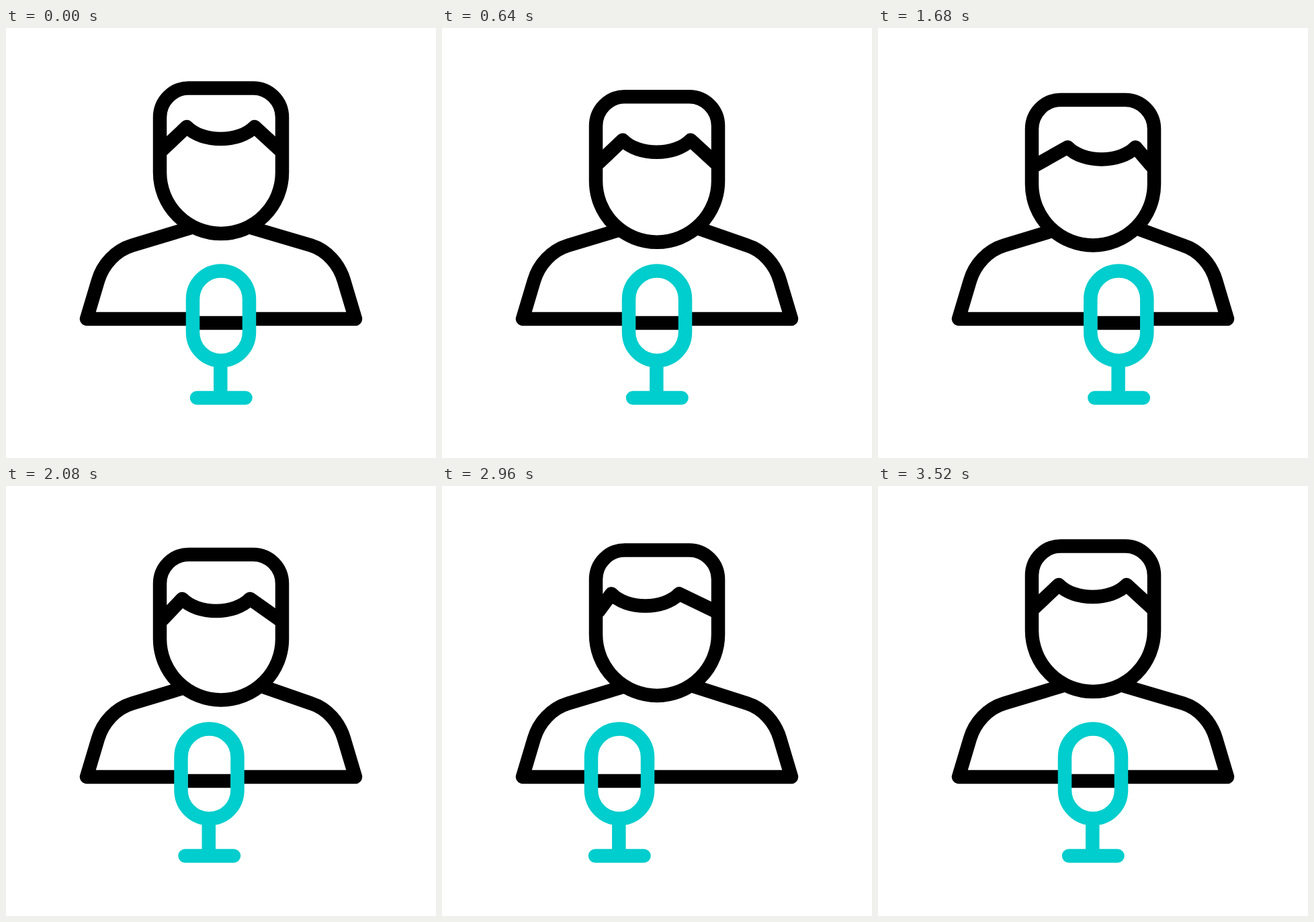
An HTML page for the animation above (3600 ms loop, 640 by 640 pixels).

```html
<!DOCTYPE html>
<html lang="en">
<head>
<meta charset="utf-8">
<title>Interview</title>
<style>
  html, body { margin: 0; width: 100%; height: 100%; overflow: hidden; background: #fff; }
  svg { display: block; width: 100%; height: 100%; }
</style>
</head>
<body>
<svg viewBox="0 0 640 640" fill="none" stroke="#000" stroke-width="20.5" stroke-linecap="round" stroke-linejoin="round">
  <path id="body"/>
  <path id="head" fill="#fff" d="M229 215V133A43 43.500 0 0 1 272 89.500H368A43 43.500 0 0 1 411 133V215A91 91 0 0 1 229 215Z"/>
  <path id="fringe"/>
  <g id="mic">
    <rect x="278" y="361.500" width="84" height="133.500" rx="42" fill="#fff" stroke="none"/>
    <path d="M288 439H352" stroke-linecap="butt"/>
    <g stroke="#00cdcd">
      <rect x="278" y="361.500" width="84" height="133.500" rx="42"/>
      <path d="M319.300 500V550M284 550.500H356.500"/>
    </g>
  </g>
</svg>
<script>
const LOOP = 3600, STEP = 20, REACH = 112;
const [body, head, fringe, mic] = ['body', 'head', 'fringe', 'mic'].map(id => document.getElementById(id));

// Steps at which the mic turns round, alternately left and right, from rest to rest
const turns = [0, 8, 24, 40, 50, 66, 77, 95, 115, 129, 140, 152, 176];
const END = turns[turns.length - 1];

const turnValue = i => i % (turns.length - 1) ? REACH * (-1) ** i : 0;

function sway(step) {
  const i = turns.findIndex(turn => turn > step);
  if (i < 0) return 0;
  const u = (step - turns[i - 1]) / (turns[i] - turns[i - 1]);
  const from = turnValue(i - 1), to = turnValue(i);
  return from + (to - from) * (1 - Math.cos(Math.PI * u)) / 2;
}

// One long bow of the head with two and a half small nods on top
function nod(step) {
  const u = Math.min(step / END, 1);
  return 14.5 * Math.sin(Math.PI * u ** 0.7) * (1 + 0.28 * Math.sin(5 * Math.PI * u));
}

function draw(now) {
  const step = Math.floor(now % LOOP / STEP);
  const shift = sway(step), drop = nod(step);
  const turn = 22 * Math.tanh(shift / 55);
  const side = 181 + 1.55 * drop - 0.22 * Math.abs(turn);
  const tip = 147 + 1.55 * drop + 0.25 * Math.abs(turn);

  mic.setAttribute('transform', `translate(${shift})`);
  head.setAttribute('transform', `translate(0 ${drop})`);
  body.setAttribute('d', 'M276 297L188 323.5C163 331 144 352 137 376L120 433H520L503 376' +
    `C496 352 478 331 454 323.5L364 ${297 - 0.38 * drop}`);
  fringe.setAttribute('d', `M233 ${side}L${269 + turn} ${tip}` +
    `c23 24 78 24 101 0L407 ${side}`);
  requestAnimationFrame(draw);
}
requestAnimationFrame(draw);
</script>
</body>
</html>
```
